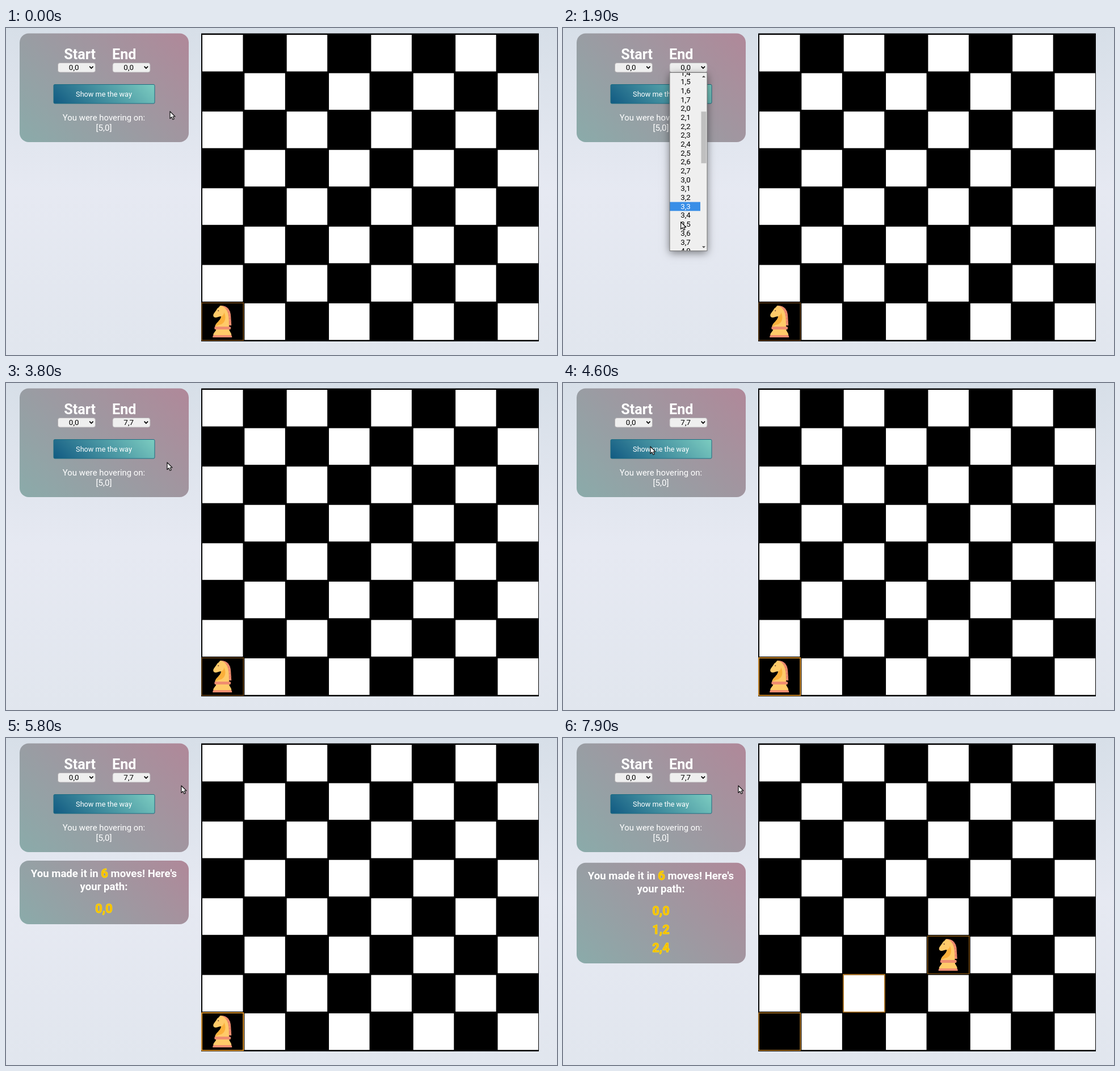
These frames come from a looping animation (971 px wide and 576 px high, 8 s). An HTML page with a canvas:

```html
<!DOCTYPE html>
<html lang="en">
<head>
<meta charset="utf-8">
<title>Knight path</title>
<style>
  html, body { margin: 0; width: 100%; height: 100%; overflow: hidden; background: #e3e7ef; }
  canvas { display: block; }
</style>
</head>
<body>
<canvas id="stage" width="971" height="576"></canvas>
<script>
const ctx = document.getElementById('stage').getContext('2d');
const LOOP = 8000, STEP = 100;
const ROW = 15.68, LIST_TOP = 79, LIST_H = 313;
const OPEN = 1200, CLOSE = 3200, RESULT = 4700;
const MID = 172.5;

// Each key is a time followed by its values.
const POINTER = [
  [0, 289, 147], [100, 286, 149], [200, 286, 149], [500, 215, 130], [700, 153, 100],
  [900, 185, 76], [1100, 216, 66], [1300, 218, 65], [1750, 208, 330], [2400, 206.5, 381],
  [3100, 206.5, 383], [3300, 225, 320], [3700, 285, 142], [3800, 284, 140], [3900, 275, 137],
  [4200, 162, 117], [4300, 154, 112], [4700, 154, 112], [5100, 316, 81], [5300, 317, 81],
  [5700, 309, 84]
];
const SCROLL = [[1700, 0], [2400, 685.5]];
const GLOW = [
  [0, .15], [100, 0], [200, 0], [900, 1], [1300, 1], [1750, 0], [1950, 0], [2400, 1],
  [3100, 1], [3500, 0], [3700, 0], [4300, 1], [4500, 1], [5100, 0], [5200, 0], [5800, 1],
  [6100, 1], [6700, 0], [6800, 0], [7400, 1], [7600, 1], [8300, 0]
];
const MOVES = [
  { at: 5700, col: 0, row: 0 },
  { at: 6700, col: 1 + 1, row: 1 },
  { at: 7700, col: 4, row: 2 }
];

const linear = p => p;
const smooth = p => p * p * (3 - 2 * p);

function track(keys, t, ease = linear) {
  if (t <= keys[0][0]) return keys[0].slice(1);
  const i = keys.findIndex(k => k[0] > t);
  if (i < 0) return keys[keys.length - 1].slice(1);
  const a = keys[i - 1], b = keys[i];
  const p = ease((t - a[0]) / (b[0] - a[0]));
  return a.slice(1).map((v, n) => v + (b[n + 1] - v) * p);
}

function box(x, y, w, h, r, fill, stroke) {
  ctx.beginPath();
  ctx.roundRect(x, y, w, h, r);
  if (fill) { ctx.fillStyle = fill; ctx.fill(); }
  if (stroke) { ctx.strokeStyle = stroke; ctx.lineWidth = 1; ctx.stroke(); }
}

function text(s, x, y, size, color = '#fff', weight = 400, align = 'center') {
  ctx.font = `${weight} ${size}px Roboto, sans-serif`;
  ctx.textAlign = align;
  ctx.fillStyle = color;
  ctx.fillText(s, x, y);
  return ctx.measureText(s).width;
}

function goldText(s, x, y, size, align) {
  const w = text(s, x, y, size, '#f7b500', 700, align);
  ctx.strokeStyle = '#ffe100';
  ctx.lineWidth = 1;
  ctx.lineJoin = 'round';
  ctx.strokeText(s, x, y);
  return w;
}

// Gradient running from bottom left to top right at 45 degrees.
function diagonal(x, y, w, h, from, to) {
  const cx = x + w / 2, cy = y + h / 2, d = (w + h) / 4;
  const g = ctx.createLinearGradient(cx - d, cy + d, cx + d, cy - d);
  g.addColorStop(0, from);
  g.addColorStop(1, to);
  return g;
}

function panel(y, h) {
  box(24, y, 298, h, 16, diagonal(24, y, 298, h, '#8aabaa', '#b08899'));
}

function background() {
  const g = ctx.createLinearGradient(0, 0, 0, 576);
  g.addColorStop(0, '#d7dfe8');
  g.addColorStop(.5, '#e6e9f2');
  g.addColorStop(1, '#e1e6ee');
  ctx.fillStyle = g;
  ctx.fillRect(0, 0, 971, 576);
}

function select(x, value) {
  box(x + .5, 61.5, 66, 16.5, 3.5, '#efefef', '#b4b0b4');
  text(value, x + 28.7, 74, 13.4, '#000');
  ctx.beginPath();
  ctx.moveTo(x + 56.2, 67.6);
  ctx.lineTo(x + 59.4, 71);
  ctx.lineTo(x + 62.6, 67.6);
  ctx.strokeStyle = '#000';
  ctx.lineWidth = 1.8;
  ctx.stroke();
}

function controls(t) {
  panel(9.5, 191.5);
  text('Start', 102.2, 54.5, 25.2, '#fff', 700, 'left');
  text('End', 187, 54.5, 25.2, '#fff', 700, 'left');
  select(91, '0,0');
  select(187.5, t < CLOSE ? '0,0' : '7,7');
  box(84, 99.5, 178, 33.5, 2, diagonal(84, 99, 178, 34, '#115a82', '#7dcdc1'), '#1d6c80');
  text('Show me the way', MID, 121.3, 12.7);
  text('You were hovering on:', MID, 162.5, 14.9);
  text('[5,0]', MID, 180.5, 15.2);
}

function result(t) {
  if (t < RESULT) return;
  const path = MOVES.filter(m => t >= m.at);
  const n = path.length;
  const top = 214 + 1.9 * n;
  panel(top, n ? 79.5 + 32.6 * n : 66);

  const before = 'You made it in ', after = " moves! Here's", size = 18.6, big = 22;
  ctx.font = `700 ${size}px Roboto, sans-serif`;
  let w = ctx.measureText(before).width + ctx.measureText(after).width;
  ctx.font = `700 ${big}px Roboto, sans-serif`;
  w += ctx.measureText('6').width;
  let x = MID - w / 2;
  x += text(before, x, top + 29.5, size, '#fff', 700, 'left');
  x += goldText('6', x, top + 30, big, 'left');
  text(after, x, top + 29.5, size, '#fff', 700, 'left');
  text('your path:', MID, top + 52.3, size, '#fff', 700);
  path.forEach((m, i) => goldText(`${m.row},${m.col}`, MID, top + 92.5 + 32.5 * i, 21.8, 'center'));
}

const cellX = col => 346 + 74.36 * col;
const cellY = row => 12 + 67.57 * (7 - row);
const CELL_W = 71.5, CELL_H = 64.5;

function board() {
  ctx.fillStyle = '#000';
  ctx.fillRect(344, 9.5, 595, 542.5);
  ctx.fillStyle = '#fff';
  for (let row = 0; row < 8; row++)
    for (let col = 0; col < 8; col++)
      if ((row + col) % 2) ctx.fillRect(cellX(col), cellY(row), CELL_W, CELL_H);
}

function glowCell(m, v) {
  const mix = (a, b) => Math.round(a + (b - a) * v);
  ctx.strokeStyle = `rgb(${mix(112, 240)},${mix(70, 160)},${mix(14, 44)})`;
  ctx.lineWidth = 1.3 + .5 * v;
  ctx.strokeRect(cellX(m.col) - .8, cellY(m.row) - .8, CELL_W + 1.6, CELL_H + 1.6);
}

const KNIGHT = [
  ['#ef8d70', 'M-3 -28C8 -29 15 -20 15 -9L16 7H8L4 -16Z'],
  ['#ffca69', 'M-4 -28C4 -27 10 -20 11 -8C12 -2 11 4 12 9H-13C-12 2 -3 -1 -2 -9C-6 -9 -9 -7 -12 -7C-16 -7 -17 -11 -15 -14L-10 -21C-9 -24 -6 -24 -4 -28Z'],
  ['#fbb03b', 'M-2 -9C1 -10 3 -13 3 -16C7 -8 6 1 -2 5C-7 6 -10 7 -12 9C-12 2 -3 -1 -2 -9Z'],
  ['#ffca69', 'M-11 13H12C12 18 16 19 16 24H-16C-16 19 -11 18 -11 13Z'],
  ['#ef8d70', 'M-13 9H14Q16 11.500 14 14H-13Q-15 11.500 -13 9Z'],
  ['#ef8d70', 'M-15 24H15Q17 24 17 28H-17Q-17 24 -15 24Z'],
  ['#6b4034', 'M-8 -19a1 1 0 1 1 2 0a1 1 0 1 1 -2 0Z']
].map(([color, d]) => [color, new Path2D(d)]);
const MANE = new Path2D('M8 -21L11 -23M10 -16L14 -18M11 -11L15 -12M11.500 -5L15 -6M12 1L16 0');

function knight(m) {
  ctx.save();
  ctx.translate(cellX(m.col) + CELL_W / 2 - .5, cellY(m.row) + CELL_H / 2 - .2 + .3 * m.row / 7);
  for (const [color, path] of KNIGHT) {
    ctx.fillStyle = color;
    ctx.fill(path);
  }
  ctx.strokeStyle = '#d8705c';
  ctx.lineWidth = .8;
  ctx.stroke(MANE);
  ctx.restore();
}

function pieces(t) {
  const [v] = track(GLOW, t, smooth);
  const visited = MOVES.filter((m, i) => i === 0 || t >= m.at);
  visited.forEach((m, i) => glowCell(m, i < 2 ? v : smooth((t - m.at) / 700)));
  knight(visited[visited.length - 1]);
}

function triangle(x, y, dir, color) {
  ctx.beginPath();
  ctx.moveTo(x - 3, y - 1.5 * dir);
  ctx.lineTo(x + 3, y - 1.5 * dir);
  ctx.lineTo(x, y + 1.5 * dir);
  ctx.fillStyle = color;
  ctx.fill();
}

function hovered(t) {
  const [, y] = track(POINTER, t), [s] = track(SCROLL, t);
  return Math.min(63, Math.max(0, Math.floor((y - LIST_TOP + s) / ROW)));
}

function dropdown(t) {
  if (t < OPEN || t >= CLOSE) return;
  const [scroll] = track(SCROLL, t);
  const active = hovered(Math.min(t, 2400) - 30);
  ctx.save();
  ctx.shadowColor = 'rgba(0,0,0,.5)';
  ctx.shadowBlur = 14;
  ctx.shadowOffsetY = 3;
  box(188, LIST_TOP, 66, LIST_H + 1, 0, '#efefef');
  ctx.restore();

  ctx.save();
  ctx.beginPath();
  ctx.rect(188, LIST_TOP, 66, LIST_H);
  ctx.clip();
  for (let i = 0; i < 64; i++) {
    const y = LIST_TOP + i * ROW - scroll;
    if (y < LIST_TOP - ROW || y > LIST_TOP + LIST_H) continue;
    if (i === active) box(188, y, 54, ROW, 0, '#398ee7');
    text(`${i >> 3},${i % 8}`, 216, y + 12.3, 13.4, i === active ? '#fff' : '#000');
  }
  ctx.restore();

  box(243.5, 91 + 197 * scroll / 685.5, 9, 91, 0, '#bfbfbf');
  triangle(248, 85.5, -1, scroll ? '#444' : '#999');
  triangle(248, 386, 1, '#444');
  box(188, LIST_TOP - .5, 66, LIST_H + 1, 0, null, '#777');
}

const ARROW = new Path2D('M0 0V12.500L2.900 9.800L5 14.300L7.200 13.300L5.200 9H9Z');

function pointer(t) {
  const [x, y] = track(POINTER, t);
  ctx.save();
  ctx.translate(x, y);
  ctx.lineJoin = 'round';
  ctx.fillStyle = '#fff';
  ctx.strokeStyle = '#111';
  ctx.lineWidth = 1.2;
  ctx.fill(ARROW);
  ctx.stroke(ARROW);
  ctx.restore();
}

function draw(now) {
  let t = Math.floor((now % LOOP) / STEP) * STEP;
  // The view stands still while the list is at its end.
  if (t > 2400 && t < 3100) t = 2400;
  background();
  controls(t);
  result(t);
  board();
  pieces(t);
  dropdown(t);
  pointer(t);
}

const start = performance.now();
function loop() {
  draw(performance.now() - start);
  requestAnimationFrame(loop);
}
loop();
</script>
</body>
</html>
```
